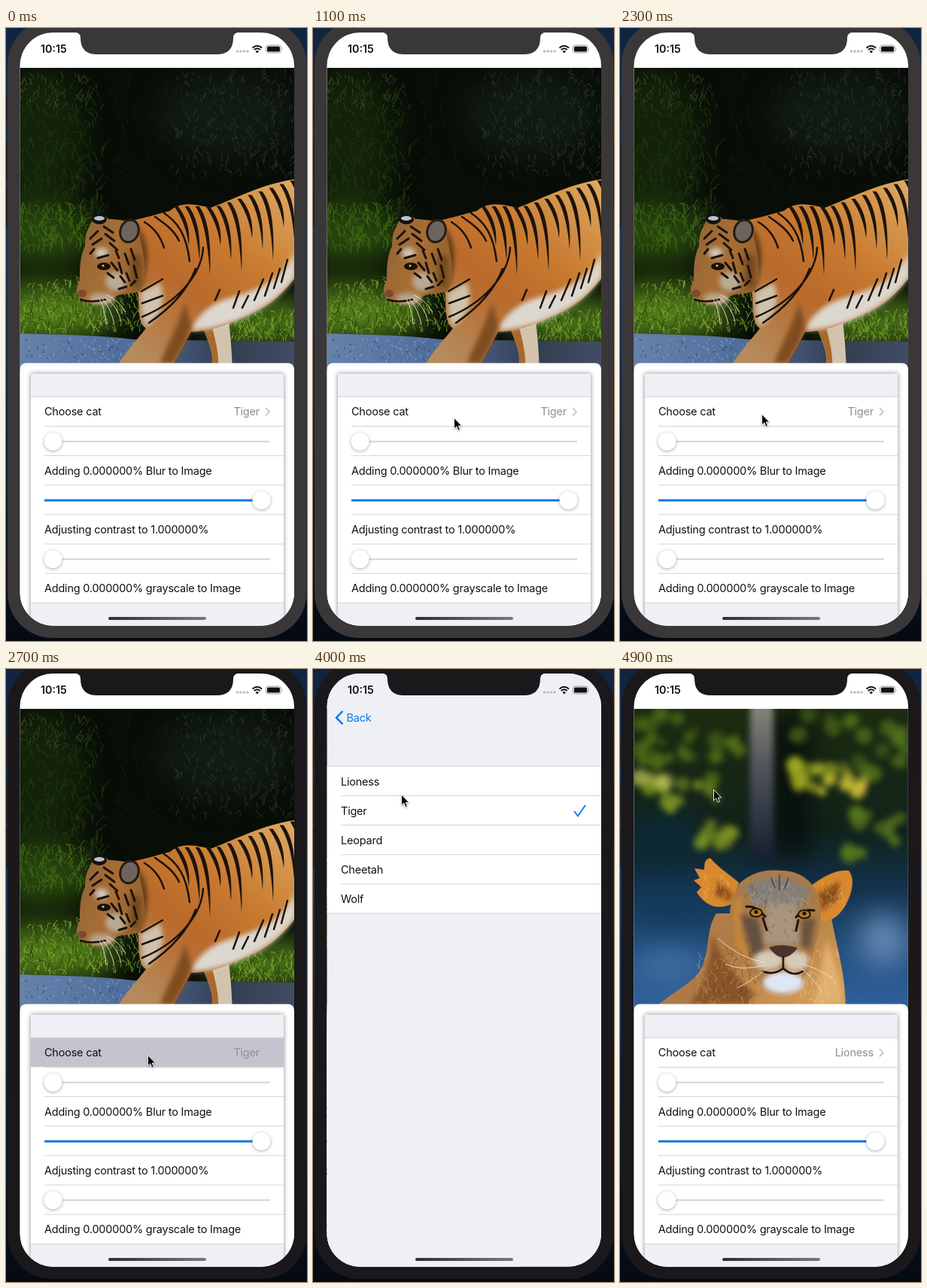
An HTML page for the animation above (5 s loop, 400x815 px).

```html
<!DOCTYPE html>
<html lang="en">
<head>
<meta charset="utf-8">
<title>Cat picker</title>
<style>
html, body { margin: 0; height: 100%; overflow: hidden; background: #0b1322; }
svg { display: block; width: 100vw; height: 100vh; }
text { font: 14.5px Inter, "Liberation Sans", sans-serif; letter-spacing: -.22px; fill: #111; }
.grey { fill: #8e8e93; text-anchor: end; }
.blue { fill: #087aec; }
.line { stroke: #d3d2d8; stroke-width: 1; }
.thumb { fill: #fff; filter: drop-shadow(0 1.5px 2px #0005); }
.soft { filter: blur(3px); }
.haze { filter: blur(18px); }
.bokeh { filter: blur(4px); }
.ink { fill: none; stroke: #1b120c; stroke-linecap: round; }
</style>
</head>
<body>
<svg viewBox="0 0 400 815" preserveAspectRatio="none">
  <defs>
    <clipPath id="screen"><rect x="18.5" y="6" width="364.5" height="788.5" rx="44"/></clipPath>
    <clipPath id="frame"><rect x="18.5" y="53" width="364.5" height="402"/></clipPath>
    <linearGradient id="desk" x2="0" y2="1">
      <stop stop-color="#10243f"/><stop offset=".35" stop-color="#16345f"/><stop offset="1" stop-color="#050a12"/>
    </linearGradient>
    <linearGradient id="fur" x1="1" y1="0" x2=".25" y2="1">
      <stop stop-color="#dfab63"/><stop offset=".4" stop-color="#c87a30"/><stop offset=".65" stop-color="#b9692a"/><stop offset="1" stop-color="#b58a5c"/>
    </linearGradient>
    <linearGradient id="face" x2="1" y2=".5">
      <stop stop-color="#8d6238"/><stop offset=".6" stop-color="#a86e34"/><stop offset="1" stop-color="#94602c"/>
    </linearGradient>
    <linearGradient id="road" x2="1">
      <stop stop-color="#6482ab"/><stop offset=".45" stop-color="#4d6a98"/><stop offset=".75" stop-color="#333d4f"/><stop offset="1" stop-color="#414d64"/>
    </linearGradient>
    <linearGradient id="dusk" x2="0" y2="1">
      <stop stop-color="#1d2c10"/><stop offset=".4" stop-color="#11221a"/><stop offset=".58" stop-color="#123049"/><stop offset=".8" stop-color="#22507f"/><stop offset="1" stop-color="#31629f"/>
    </linearGradient>
    <linearGradient id="trunk" x2="0" y2="1">
      <stop stop-color="#8b8b80"/><stop offset=".4" stop-color="#54565c"/><stop offset="1" stop-color="#131f30"/>
    </linearGradient>
    <linearGradient id="tan" x2="1" y2=".6">
      <stop stop-color="#b58350"/><stop offset=".5" stop-color="#ad7a44"/><stop offset="1" stop-color="#d39a55"/>
    </linearGradient>
    <linearGradient id="edge" x2="1"><stop stop-color="#0000"/><stop offset="1" stop-color="#0002"/></linearGradient>
    <linearGradient id="bar" x2="1"><stop stop-color="#2f2f31"/><stop offset="1" stop-color="#79797d"/></linearGradient>
  </defs>

  <rect width="400" height="815" fill="url(#desk)"/>
  <path d="M0 92h4v32H0zM0 150h4v55H0zM0 210h4v54H0zM397 150h3v86h-3z" fill="#201f22"/>
  <rect id="bezel" x="2" y="-11" width="397.5" height="822" rx="60"/>

  <g clip-path="url(#screen)">
    <g id="main">
      <rect x="18" width="500" height="815" fill="#fff"/>
      <g clip-path="url(#frame)">
        <g id="tiger">
          <rect x="18" y="53" width="366" height="402" fill="#080d07"/>
          <g class="haze">
            <ellipse cx="45" cy="150" rx="60" ry="100" fill="#132309"/>
            <ellipse cx="290" cy="115" rx="90" ry="55" fill="#111b13"/>
            <ellipse cx="45" cy="275" rx="75" ry="40" fill="#27450d"/>
            <ellipse cx="50" cy="378" rx="100" ry="36" fill="#527d1a"/>
            <ellipse cx="345" cy="390" rx="80" ry="30" fill="#4a741a"/>
          </g>
          <g id="grass" fill="none" stroke-linecap="round"></g>
          <path d="M18 406C70 408 120 408 170 414L384 417V456H18Z" fill="url(#road)"/>
          <g id="grit" fill="none"></g>
          <path d="M262 398C268 418 277 428 274 456H301C300 425 298 408 296 388Z" fill="#d3c3ad"/>
          <path d="M262 398C268 418 277 428 274 456H282C284 430 276 410 274 396Z" fill="#a9682c"/>
          <path d="M384 201C345 206 310 224 272 239C250 234 232 231 218 243C200 248 185 252 168 256C178 290 172 330 176 352C176 380 178 395 186 399C172 418 158 430 144 456H217C232 430 240 415 246 404C285 402 300 390 330 378C352 368 370 350 384 332Z" fill="url(#fur)"/>
          <path class="soft" d="M384 296C370 335 335 348 300 358C270 366 252 385 246 402C290 400 320 384 340 372C360 360 374 345 384 330Z" fill="#dcd7cf"/>
          <path class="soft" d="M178 352C182 370 178 388 187 397C205 383 214 365 204 338Z" fill="#cfc2ae"/>
          <path class="soft" d="M172 262C192 280 190 320 178 350C182 320 182 285 172 262Z" fill="#4d3217"/>
          <path class="soft" d="M238 364C230 395 212 425 205 446H222C236 425 244 408 246 394Z" fill="#7f4c20"/>
          <g id="stripes" fill="#1d130b"></g>
          <path class="ink" stroke-width="2.500" d="M262 292C260 330 225 366 181 384M252 320C240 352 215 375 190 392M210 246C228 258 240 275 244 310M198 251C214 262 224 270 230 283M184 258C200 268 206 280 210 292M180 350L208 334M181 366L208 356M278 362l6-14M302 372l8-22M314 372l8-16M330 362l12-28M344 356l10-30M356 346l8-26M366 338l8-30"/>
          <path d="M112 262C116 248 130 245 136 254C145 254 155 256 158 256C172 250 181 262 177 276C183 300 190 330 178 350C167 355 150 352 145 358C135 371 115 369 102 362C92 356 92 345 98 335C98 320 98 304 105 290C105 276 107 270 112 262Z" fill="url(#face)"/>
          <g class="soft">
            <ellipse cx="146" cy="337" rx="14" ry="13" fill="#b9aa93"/>
            <ellipse cx="127" cy="360" rx="17" ry="8" fill="#b8a68c"/>
            <ellipse cx="127" cy="299" rx="9" ry="7" fill="#cdc8bd"/>
            <path d="M166 300l14 4-2 42-12-4z" fill="#74481f"/>
          </g>
          <ellipse cx="124" cy="254" rx="10" ry="7" fill="#16120f"/>
          <ellipse cx="124" cy="253" rx="7" ry="3" fill="#b9c4d2"/>
          <ellipse cx="164" cy="270" rx="12" ry="15" fill="#6d655d" stroke="#241b14" stroke-width="3" transform="rotate(18 164 270)"/>
          <path class="ink" stroke-width="3" d="M112 280l10-10M115 288l12-8M130 264l12 8M132 274l12 9M138 286l10 9M146 296l4 10M140 312l8 10M158 300l5 14M166 294l5 14M150 312l4 14M160 326l4 10M170 316l4 16M152 330l6 8M150 347l10-3M122 306l14-4M112 300l5-6M135 326l8 6M166 342l6-6"/>
          <ellipse cx="130" cy="317" rx="9" ry="5" fill="#17100b"/><circle cx="129" cy="316" r="1.6" fill="#d8b567"/>
          <ellipse cx="101" cy="353" rx="6" ry="5" fill="#7c4a34"/>
          <path class="ink" stroke-width="2.500" d="M99 361Q112 366 132 361"/>
          <path d="M124 360Q132 375 133 394M128 360Q140 374 144 394M132 358Q148 370 153 390M134 355Q150 362 159 378" fill="none" stroke="#e9e6de" stroke-width=".9"/>
        </g>
        <g id="lioness">
          <rect x="18" y="53" width="366" height="402" fill="url(#dusk)"/>
          <g class="haze">
            <rect x="205" y="60" width="45" height="190" fill="#070d0c"/>
            <ellipse cx="60" cy="225" rx="50" ry="35" fill="#0c2a38"/>
            <ellipse cx="70" cy="305" rx="60" ry="20" fill="#123a5c"/>
            <ellipse cx="350" cy="360" rx="32" ry="35" fill="#6688b4"/>
            <ellipse cx="65" cy="395" rx="50" ry="20" fill="#4570a4"/>
          </g>
          <rect class="bokeh" x="173" y="40" width="31" height="215" fill="url(#trunk)"/>
          <g id="bokeh" class="bokeh"></g>
          <path d="M40 456C65 432 90 422 104 405C122 380 112 350 128 325H280C288 372 300 400 300 456Z" fill="url(#tan)"/>
          <path class="soft" d="M122 352C140 395 160 415 180 432L170 446H92C114 420 122 385 122 352Z" fill="#8a542a"/>
          <path class="soft" d="M275 360C290 400 295 420 296 446H258Z" fill="#e0b070"/>
          <path d="M158 284C142 270 128 262 120 251C110 254 113 264 112 267L99 265L106 278L98 281L108 290L102 297C116 318 132 320 150 312ZM254 288C270 276 288 266 304 268C313 278 309 300 298 317C290 330 278 338 264 335Z" fill="#d8892e"/>
          <path class="soft" d="M150 300L130 282L126 300L146 309ZM263 298L292 282L290 306L268 322Z" fill="#8a4b1a"/>
          <path d="M158 286C174 270 195 266 212 268C234 267 250 278 258 290C272 315 268 345 258 370C252 400 246 425 220 433C194 434 180 412 170 390C150 370 142 340 148 310Z" fill="#aa7b4a"/>
          <g class="soft">
            <path d="M164 290Q208 262 252 294L242 318Q212 306 182 318Z" fill="#857f78"/>
            <path d="M196 312h38l6 54h-50z" fill="#a8957f"/>
            <path d="M160 325l24 8 8 42-16 8z" fill="#655140"/>
            <path d="M242 332h18l-8 42-12-8z" fill="#6f543b"/>
            <path d="M150 312l12-12-2 50 18 48-24-30z" fill="#c9863a"/>
            <ellipse cx="197" cy="387" rx="19" ry="13" fill="#d6cbb9"/>
            <ellipse cx="234" cy="388" rx="17" ry="13" fill="#d6cbb9"/>
            <ellipse cx="217" cy="417" rx="27" ry="15" fill="#dfe7f3"/>
          </g>
          <g id="coat" fill="none" stroke-linecap="round" opacity=".6"></g>
          <path d="M198 370Q216 364 236 371Q228 382 217 384Q206 382 198 370Z" fill="#49332b"/>
          <path class="ink" stroke-width="2.5" d="M217 383V398M217 398Q204 408 190 402M217 398Q230 410 243 402"/>
          <path class="ink" stroke-width="3" d="M168 316Q180 314 193 329M234 330Q244 318 258 321M190 331l5 16M237 334l-3 14"/>
          <ellipse cx="181" cy="324" rx="8" ry="5.5" fill="#b67a2a" stroke="#21150d" stroke-width="2"/><circle cx="181" cy="323" r="2.5" fill="#140d08"/>
          <ellipse cx="245" cy="326" rx="8" ry="5.5" fill="#b67a2a" stroke="#21150d" stroke-width="2"/><circle cx="245" cy="325" r="2.5" fill="#140d08"/>
          <path class="ink" stroke-width="1.5" opacity=".6" d="M212 274v20M201 278l5 13M224 278l-5 13"/>
          <path d="M192 390Q160 385 130 358M193 394Q160 402 140 392M196 398Q170 418 156 424M238 392Q262 396 283 412M238 396Q258 410 268 430" fill="none" stroke="#efe6d6" stroke-width=".9"/>
        </g>
      </g>
      <rect x="18.5" y="445.500" width="364.500" height="380" rx="8" fill="#fff"/>
      <rect x="33" y="459.500" width="336" height="370" fill="#efeff5" style="filter:drop-shadow(0 0 3px #0007)"/>
      <rect x="33" y="490" width="336" height="274.500" fill="#fff"/>
      <rect id="pressed" x="33" y="490" width="336" height="39.200" fill="#c5c4ce"/>
      <g id="form"></g>
      <text id="choice" class="grey" x="337" y="515.300"></text>
      <path id="arrow" d="M345 505l5 5.200-5 5.200" fill="none" stroke="#c2c2c7" stroke-width="1.700"/>
      <rect id="dim" x="18" width="500" height="815"/>
    </g>
    <g id="list">
      <rect x="12" width="6.500" height="815" fill="url(#edge)"/>
      <rect x="18.500" width="366" height="815" fill="#efeff6"/>
      <rect x="18.500" y="129" width="366" height="195.500" fill="#fff"/>
      <rect id="tapped" x="18.500" y="129" width="366" height="39.200" fill="#d1d1d6"/>
      <g id="cats"></g>
      <path id="check" d="M347 189l5 6.500 10-14.500" fill="none" stroke="#087aec" stroke-width="1.900"/>
    </g>
    <g id="back">
      <path d="M39.500 56l-8.500 8.700 8.500 8.700" fill="none" stroke="#087aec" stroke-width="2.500"/>
      <text class="blue" x="44.500" y="69.800">Back</text>
    </g>
    <text x="46" y="33" style="font-size:14.3px;font-weight:600;letter-spacing:0">10:15</text>
    <g fill="#bdbcc2"><circle cx="307.500" cy="31" r="1.800"/><circle cx="312" cy="31" r="1.800"/><circle cx="316.500" cy="31" r="1.800"/><circle cx="321" cy="31" r="1.800"/></g>
    <path d="M327.500 26.500q6.300-5.500 12.600 0M329.800 29q4-3.400 8 0" fill="none" stroke="#111" stroke-width="2"/>
    <path d="M331.500 31q2.300-1.800 4.600 0l-2.300 2.500z" fill="#111"/>
    <rect x="345.500" y="23" width="20" height="10" rx="3" fill="none" stroke="#999" stroke-width="1"/>
    <rect x="347" y="24.500" width="17" height="7" rx="1.600" fill="#111"/>
    <path d="M367 26.500q1.600 1.500 0 3z" fill="#999"/>
    <rect x="136" y="783" width="130" height="4" rx="2" fill="url(#bar)"/>
  </g>
  <path id="notch" d="M91 5.500Q99 6 99 13Q99 35 121 35H280Q302 35 302 13Q302 6 310 5.500Z"/>
  <g id="cursor"><path d="M0 0V15.500L3.600 12.200L6 18L8.600 16.900L6.200 11.300H11Z" transform="scale(.92)" fill="#000" stroke="#fff" style="filter:drop-shadow(0 1px 1px #0006)"/></g>
</svg>
<script>
const $ = id => document.getElementById(id);
const set = (id, name, value) => $(id).setAttribute(name, value);
const many = (n, make) => Array.from({ length: n }, (_, i) => make(i)).join('');

let seed = 7;
const rand = (a, b) => a + (b - a) * ((seed = seed * 16807 % 2147483647) / 2147483647);

// Photo details
const blades = (n, x0, x1, y0, y1, size, color) => `<path stroke="${color}" d="${many(n, () =>
  `M${rand(x0, x1)} ${rand(y0, y1)}q${rand(-3, 3)} ${-size / 2} ${rand(-size, size) * .7} ${-size * rand(.4, 1)}`)}"/>`;
$('grass').innerHTML =
  blades(200, 18, 130, 80, 270, 16, '#203810') +
  blades(60, 18, 110, 65, 110, 9, '#3a4322') +
  blades(220, 225, 384, 60, 200, 9, '#26362a') +
  blades(90, 130, 384, 60, 220, 12, '#141f13') +
  blades(130, 18, 110, 240, 300, 14, '#3f6912') +
  blades(190, 18, 180, 340, 408, 11, '#7ba52b') +
  blades(110, 18, 180, 335, 408, 12, '#29480c') +
  blades(120, 295, 384, 378, 417, 11, '#78a02a') +
  blades(60, 295, 384, 378, 417, 11, '#29480c');
$('grit').innerHTML = blades(70, 18, 170, 414, 450, 4, '#8aa0c2') + blades(70, 18, 384, 416, 450, 5, '#33486c');
$('coat').innerHTML =
  blades(70, 100, 185, 385, 450, 9, '#d9a565') + blades(50, 125, 180, 375, 450, 9, '#6b3d1b') +
  blades(50, 240, 290, 375, 450, 9, '#f0cf96') + blades(50, 172, 250, 290, 316, 6, '#b7afa2') +
  blades(40, 165, 255, 285, 366, 6, '#5f4a38') + blades(30, 110, 145, 275, 308, 8, '#f0b253') +
  blades(30, 268, 298, 285, 318, 8, '#eeb45c');

$('stripes').innerHTML = many(12, i => {
  const x = 226 + i * 14, y = x < 272 ? 237 : 240 - (x - 272) * .345, len = 52 + i % 3 * 20;
  return `<path d="M${x - 2.5} ${y}Q${x + 13} ${y + 22} ${x + 17} ${y + len}Q${x + 20} ${y + 22} ${x + 2.5} ${y}Z"/>`;
});

const glow = (n, x, y, w, h, color) => many(n, () =>
  `<circle cx="${x + rand(-w, w)}" cy="${y + rand(-h, h)}" r="${rand(6, 12)}" fill="${color}" opacity="${rand(.4, .95)}"/>`);
$('bokeh').innerHTML =
  glow(20, 60, 95, 40, 35, '#4d6c18') + glow(12, 85, 170, 50, 18, '#7d9422') +
  glow(6, 42, 150, 22, 8, '#b7bb52') + glow(9, 140, 115, 22, 40, '#587418') +
  glow(10, 128, 215, 22, 18, '#7b9021') + glow(16, 265, 145, 42, 18, '#a0aa22') +
  glow(18, 340, 100, 40, 40, '#50701c') + glow(14, 340, 215, 38, 35, '#5b7c1e') +
  glow(7, 295, 155, 32, 8, '#d0c039') + glow(7, 255, 75, 35, 15, '#3f5a18');

// Settings form and list rows
const ROW = 39.15;
const rule = (x0, x1, y) => `<path class="line" d="M${x0} ${y}H${x1}"/>`;
const label = (x, y, s) => `<text x="${x}" y="${y}">${s}</text>`;
const slider = (y, x, end, color, width) =>
  `<path d="M51 ${y}H${end}" stroke="${color}" stroke-width="${width}"/><circle class="thumb" cx="${x}" cy="${y}" r="12"/>`;
const captions = ['Choose cat', 'Adding 0.000000% Blur to Image',
  'Adjusting contrast to 1.000000%', 'Adding 0.000000% grayscale to Image'];
$('form').innerHTML =
  many(8, i => rule(i % 7 ? 51 : 33, 369, 490.3 + i * ROW)) +
  many(4, i => label(51, 515.3 + i * 2 * ROW, captions[i])) +
  slider(549.7, 62.5, 351, '#d5d5d9', 2) + slider(628, 339.5, 339.5, '#1377e0', 2.8) + slider(706.3, 62.5, 351, '#d5d5d9', 2);

const cats = ['Lioness', 'Tiger', 'Leopard', 'Cheetah', 'Wolf'];
$('cats').innerHTML = many(6, i => rule(i % 5 ? 37 : 18, 384, 129.3 + i * ROW)) +
  many(5, i => label(37, 154.7 + i * ROW, cats[i]));

// Motion
const LOOP = 5000, FOCUS = 2500, PUSH = 2750, TAP = 4200, POP = 4370, RATE = .0166;
const spring = ms => ms <= 0 ? 0 : 1 - (1 + ms * RATE) * Math.exp(-ms * RATE);
const path = [[800, 215, 640], [1100, 187.5, 518.5], [1700, 188.5, 513.5], [2900, 188.5, 513.5],
  [3900, 117.5, 167], [4000, 117.5, 167], [4200, 120.5, 154.5], [4500, 120.5, 154.5], [4800, 124.5, 160.5], [LOOP, 124.5, 160.5]];

function pointer(t) {
  const i = Math.max(1, path.findIndex(k => k[0] >= t));
  const [a, b] = [path[i - 1], path[i]];
  const u = (t - a[0]) / (b[0] - a[0]), s = u * u * (3 - 2 * u);
  return [a[1] + (b[1] - a[1]) * s, a[2] + (b[2] - a[2]) * s];
}

function draw(t) {
  const shown = t < POP ? spring(t - PUSH) : 1 - spring(t - POP);
  const picked = t >= TAP;
  const shell = t < FOCUS ? '#3a3739' : '#1a181a';
  set('bezel', 'fill', shell);
  set('notch', 'fill', shell);
  set('main', 'transform', `translate(${-109.4 * shown})`);
  set('list', 'transform', `translate(${364.5 * (1 - shown)})`);
  set('list', 'visibility', shown > .005 ? 'visible' : 'hidden');
  set('dim', 'opacity', .1 * shown);
  set('back', 'opacity', Math.max(0, t < POP ? shown : shown * 2.6 - 1.6));
  set('pressed', 'opacity', t >= 2600 && t < 3500 ? 1 : 0);
  set('arrow', 'opacity', t >= 2600 && t < 3500 ? .15 : 1);
  set('tapped', 'opacity', t >= TAP && t < POP ? 1 : 0);
  set('check', 'transform', `translate(0 ${picked ? -ROW : 0})`);
  set('tiger', 'display', picked ? 'none' : 'inline');
  set('lioness', 'display', picked ? 'inline' : 'none');
  $('choice').textContent = cats[picked ? 0 : 1];
  set('cursor', 'visibility', t < path[0][0] ? 'hidden' : 'visible');
  if (t >= path[0][0]) set('cursor', 'transform', `translate(${pointer(t)})`);
}

let last = -1;
function tick() {
  const t = Math.floor((performance.now() + 5) / 100) * 100 % LOOP;
  if (t !== last) draw(last = t);
  requestAnimationFrame(tick);
}
tick();
</script>
</body>
</html>
```
